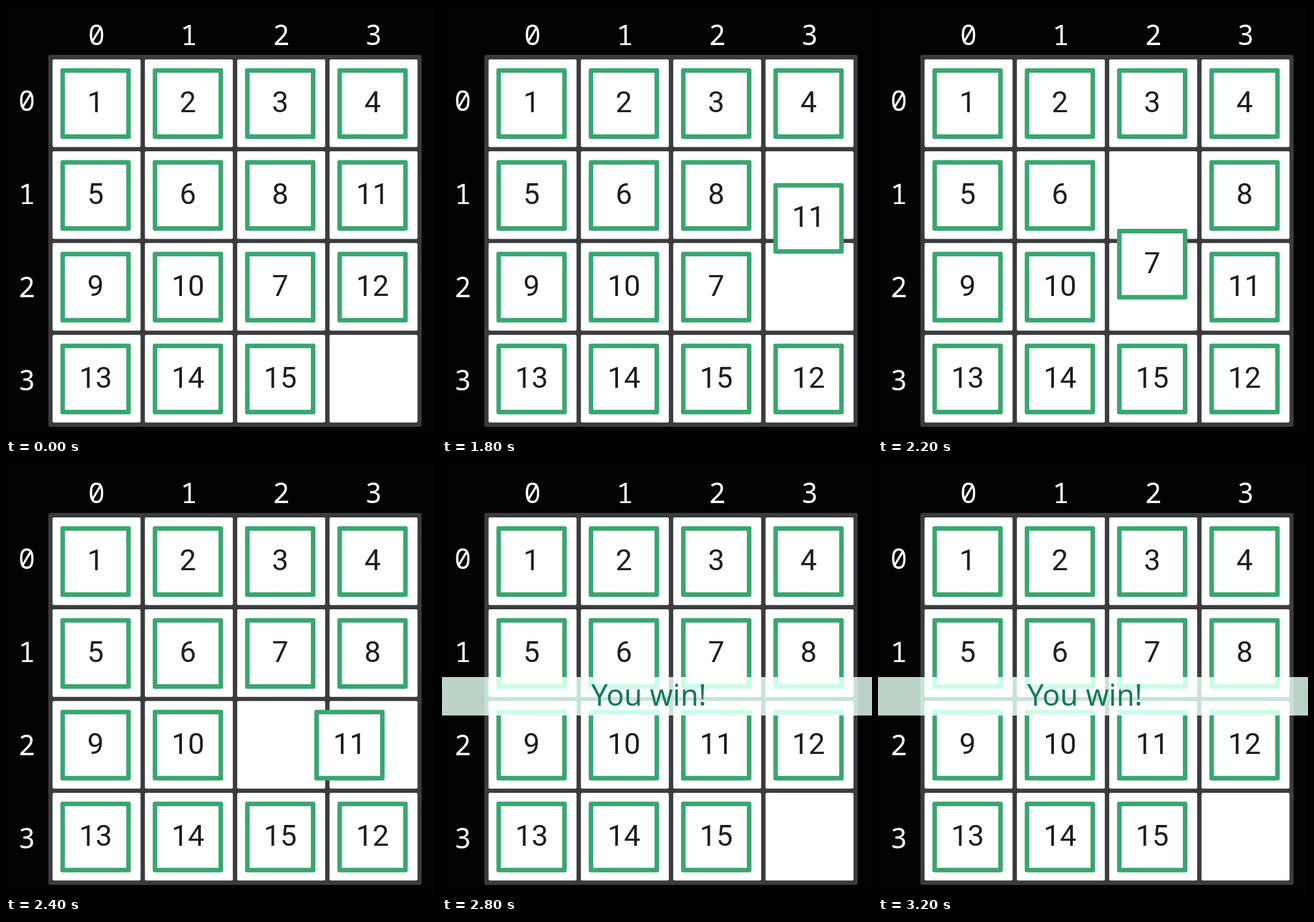
Animation of 660 by 660 pixels, one loop 5000 ms. Source, as an HTML page with a canvas:

```html
<!DOCTYPE html>
<html lang="en">
<head>
<meta charset="utf-8">
<title>Fifteen puzzle</title>
<style>
html, body { margin: 0; width: 100%; height: 100%; overflow: hidden; background: #020204; }
canvas { display: block; }
</style>
</head>
<body>
<canvas id="stage" width="660" height="660"></canvas>
<script>
const ctx = document.getElementById('stage').getContext('2d');
const LOOP = 5000, FIRST_MOVE = 1600, STEP = 200;
const PITCH_X = 141.7, PITCH_Y = 140.9;
const START = [1, 2, 3, 4, 5, 6, 8, 11, 9, 10, 7, 12, 13, 14, 15, 0];
const MOVES = [12, 11, 8, 7, 11, 12];

function box(x, y, w, h, r, color) {
  ctx.fillStyle = color;
  ctx.beginPath();
  ctx.roundRect(x, y, w, h, r);
  ctx.fill();
}

function label(text, x, y, font, color, align = 'center') {
  ctx.font = font;
  ctx.fillStyle = color;
  ctx.textAlign = align;
  ctx.fillText(text, x, y);
}

function drawBoard() {
  box(0, 0, 660, 660, 0, '#020204');
  box(65, 75, 573, 571, 3, '#3b3b3d');
  const mono = '43px "Noto Sans Mono", monospace';
  for (let i = 0; i < 4; i++) {
    label(i, 139 + i * PITCH_X, 60, mono, '#fff');
    label(i, 32, 160.5 + i * 143, mono, '#fff');
    for (let j = 0; j < 4; j++)
      box(71.5 + i * PITCH_X, 82 + j * PITCH_Y, 135, 134.5, 2, '#fefffe');
  }
}

function drawTile(n, col, row) {
  const x = 83.5 + col * PITCH_X, y = 95.5 + row * PITCH_Y;
  box(x, y, 108, 108.5, 3, '#39a66f');
  box(x + 7, y + 7, 94, 94.5, 0, '#fefffe');
  label(n, x + 54, y + 67.5, '45px Roboto, Arial, sans-serif', '#1a1f1d');
}

// The banner dims what is under it, then adds its own light.
function drawBanner() {
  box(0, 327, 660, 59, 0, 'rgba(0, 0, 0, 0.73)');
  ctx.globalCompositeOperation = 'lighter';
  box(0, 327, 660, 59, 0, 'rgb(186, 210, 197)');
  ctx.globalCompositeOperation = 'source-over';
  label('You win!', 229, 371, '45px "Noto Sans", sans-serif', '#13795b', 'left');
}

function slide(cells, n) {
  const from = cells.indexOf(n), to = cells.indexOf(0);
  cells[to] = n;
  cells[from] = 0;
}

function draw(time) {
  const step = Math.floor((time - FIRST_MOVE) / STEP);
  const cells = START.slice();
  MOVES.slice(0, Math.max(0, step)).forEach(n => slide(cells, n));
  drawBoard();
  const mover = MOVES[step], gap = cells.indexOf(0);
  cells.forEach((n, i) => {
    if (n && n !== mover) drawTile(n, i % 4, i >> 2);
  });
  if (mover) {
    // A sliding tile is seen a quarter of the way to the gap.
    const i = cells.indexOf(mover), col = i % 4, row = i >> 2;
    drawTile(mover, col + (gap % 4 - col) / 4, row + ((gap >> 2) - row) / 4);
  }
  if (step >= MOVES.length) drawBanner();
}

function frame() {
  draw(performance.now() % LOOP);
  requestAnimationFrame(frame);
}
frame();
</script>
</body>
</html>
```
